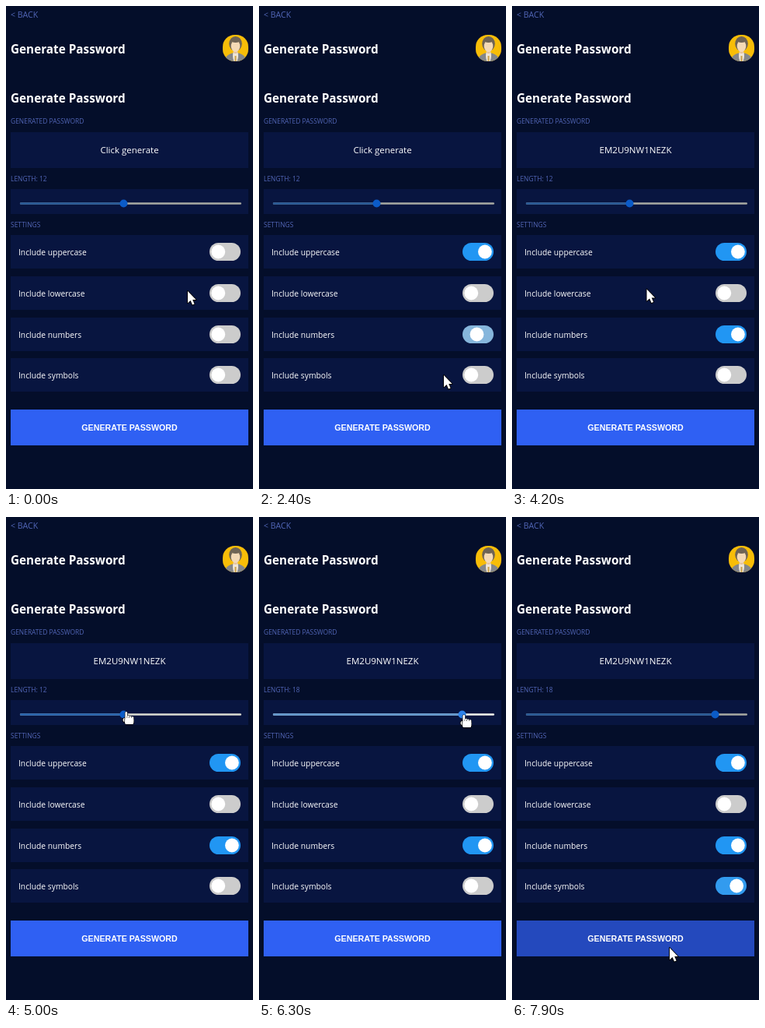
An HTML page with a canvas that plays this animation: 318 px wide and 620 px high, repeating every 8 s.

```html
<!DOCTYPE html>
<html lang="en">
<head>
<meta charset="utf-8">
<title>Generate Password</title>
<style>
  html, body { margin: 0; width: 100%; height: 100%; overflow: hidden; background: #040e2a; }
  canvas { display: block; width: 318px; height: 620px; }
</style>
</head>
<body>
<canvas id="stage"></canvas>
<script>
const W = 318, H = 620, LOOP = 8000, TICK = 100;
const canvas = document.getElementById('stage');
const ctx = canvas.getContext('2d');
const dpr = window.devicePixelRatio || 1;
canvas.width = W * dpr;
canvas.height = H * dpr;

const SANS = '"Open Sans", "Noto Sans", sans-serif';
const BUTTON_FONT = 'bold 10.67px "Liberation Sans", Arial, sans-serif';
const BG = '#040e2a', PANEL = '#081540', LABEL = '#5165b5';

const DRAG_START = 5200, DRAG_END = 6100, RELEASE = 6300, GENERATED = 3100;

// Each move glides on from wherever the pointer rests.
const home = { x: 234, y: 366 };
const moves = [
  { from: 100, to: 800, x: 284, y: 325 },
  { from: 1200, to: 1800, x: 280, y: 418 },
  { from: 2200, to: 2400, x: 238, y: 474 },
  { from: 2600, to: 2900, x: 201, y: 541 },
  { from: 3700, to: 4500, x: 157, y: 257 },
  { from: 4500, to: 5000, x: 155, y: 250 },
  { from: DRAG_START, to: DRAG_END, x: 264, y: 254 },
  { from: RELEASE, to: 6600, x: 305, y: 310 },
  { from: 6600, to: 7000, x: 296, y: 415 },
  { from: 7000, to: 7400, x: 283, y: 476 },
  { from: 7600, to: 7900, x: 203, y: 553 }
];

const switches = [
  { name: 'uppercase', on: 1250 },
  { name: 'lowercase', on: Infinity },
  { name: 'numbers', on: 2300 },
  { name: 'symbols', on: 7650 }
].map((s, i) => ({ ...s, y: Math.round(294 + i * 52.8) }));

const clamp = (v, a, b) => Math.min(b, Math.max(a, v));
const mix = (a, b, p) => a + (b - a) * p;

// CSS "ease": cubic-bezier(.25, .1, .25, 1)
function ease(x) {
  const bez = (u, a, b) => 3 * u * (1 - u) ** 2 * a + 3 * u * u * (1 - u) * b + u ** 3;
  let lo = 0, hi = 1;
  for (let i = 0; i < 20; i++) {
    const mid = (lo + hi) / 2;
    if (bez(mid, 0.25, 0.25) < x) lo = mid; else hi = mid;
  }
  return bez(lo, 0.1, 1);
}

function pointerAt(t) {
  return moves.reduce((at, m) => {
    const p = clamp((t - m.from) / (m.to - m.from), 0, 1);
    return { x: mix(at.x, m.x, p), y: mix(at.y, m.y, p) };
  }, home);
}

function box(x, y, w, h, color, r = 0) {
  ctx.fillStyle = color;
  ctx.beginPath();
  ctx.roundRect(x, y, w, h, r);
  ctx.fill();
}

function oval(x, y, rx, ry, color) {
  ctx.fillStyle = color;
  ctx.beginPath();
  ctx.ellipse(x, y, rx, ry, 0, 0, Math.PI * 2);
  ctx.fill();
}

function text(str, x, y, font, color = '#fff', align = 'left') {
  ctx.font = font;
  ctx.fillStyle = color;
  ctx.textAlign = align;
  ctx.fillText(str, x, y);
}

const label = (str, y) => text(str, 6, y, `8.45px ${SANS}`, LABEL);

function avatar() {
  const x = 295.5;
  ctx.save();
  ctx.beginPath();
  ctx.roundRect(279, 37, 33, 34, 15.5);
  ctx.clip();
  box(279, 37, 33, 34, '#f8bd08');
  oval(x, 70, 13.5, 10, '#85878a');
  oval(x, 64, 3.5, 8, '#f0e6d8');
  box(x - 1, 64, 2, 8, '#c9a14a');
  oval(x, 48.5, 8.3, 9.5, '#6f6455');
  box(x - 2.5, 55, 5, 6, '#e6c39c', 2);
  oval(x, 51.5, 5.8, 7.5, '#f4d9b6');
  oval(x, 43.5, 6.5, 3.5, '#6f6455');
  ctx.restore();
}

function slider(t, hover) {
  const drag = t > DRAG_START && t <= RELEASE;
  const knob = pointerAt(clamp(t, DRAG_START, DRAG_END)).x;
  const value = Math.round(5 + (knob - 23) / 18.35);
  const x = 23 + (value - 5) * 18.35;
  const [left, right, thumb] = drag ? ['#5b92cb', '#f8f8ee', '#2f83ea']
    : hover ? ['#1f5dab', '#dcddd2', '#0b5cc8']
    : ['#225596', '#a9aaa3', '#0b5bc8'];
  label(`LENGTH: ${value}`, 224.5);
  box(6, 235, 306, 32, PANEL);
  box(18, 252.2, 285, 2.6, right, 1.3);
  box(18, 252.2, x - 18, 2.6, left, 1.3);
  oval(x, 253.5, 5, 5, thumb);
}

function toggle(s, t) {
  const p = ease(clamp((t - s.on) / 400, 0, 1));
  const rgb = [33, 150, 243].map(c => Math.round(mix(204, c, p)));
  box(6, s.y, 306, 43, PANEL);
  text(`Include ${s.name}`, 16, s.y + 25.7, `500 10.3px ${SANS}`);
  box(262, s.y + 10, 40, 23, `rgb(${rgb})`, 11.5);
  oval(mix(273.3, 290.9, p), s.y + 21.5, 8.9, 8.9, '#fff');
}

const arrow = new Path2D('M0 0V15.2L3.6 12L6 17.6L8.6 16.5L6.2 11H10.6Z');

function outlined(path, line) {
  ctx.lineWidth = line;
  ctx.stroke(path);
  ctx.fill(path);
}

function rounded(x, y, w, h, r) {
  const path = new Path2D();
  path.roundRect(x, y, w, h, r);
  return path;
}

function hand() {
  const palm = rounded(-1.8, 8, 11, 8, 2);
  outlined(rounded(-4.4, 8, 4, 5, 2), 1.6);
  outlined(palm, 1.6);
  outlined(rounded(-1.6, 0, 2.8, 11, 1.4), 1.2);
  for (let i = 0; i < 3; i++) outlined(rounded(1.2 + i * 2.7, 4.8 + i * 0.7, 2.7, 7, 1.3), 1);
  ctx.fill(palm);
}

function pointer({ x, y }, over) {
  ctx.save();
  ctx.translate(x, y);
  ctx.lineJoin = 'round';
  ctx.strokeStyle = '#000';
  ctx.fillStyle = '#fff';
  if (over) hand(); else outlined(arrow, 1.8);
  ctx.restore();
}

function draw(t) {
  const at = pointerAt(t);
  const onSlider = at.y > 247 && at.y < 256;
  const onSwitch = at.x >= 262 && at.x <= 302 &&
    switches.some(s => at.y >= s.y + 10 && at.y <= s.y + 33);
  const onButton = at.y >= 518 && at.y <= 564;

  ctx.setTransform(dpr, 0, 0, dpr, 0, 0);
  box(0, 0, W, H, BG);
  text('< BACK', 6, 15, `10.6px ${SANS}`, LABEL);
  for (const y of [61, 123.5]) text('Generate Password', 6, y, `bold 15.3px ${SANS}`);
  avatar();

  label('GENERATED PASSWORD', 150.7);
  box(6, 162, 306, 46, PANEL);
  text(t < GENERATED ? 'Click generate' : 'EM2U9NW1NEZK', 159, 189, `500 11.5px ${SANS}`, '#fff', 'center');

  slider(t, onSlider);
  label('SETTINGS', 283.7);
  switches.forEach(s => toggle(s, t));

  box(6, 518, 306, 46, onButton ? '#2449bd' : '#2f60f3');
  text('GENERATE PASSWORD', 159, 545, BUTTON_FONT, '#fff', 'center');
  pointer(at, onSlider || onSwitch);
}

function frame(now) {
  const t = now % LOOP;
  draw(t - t % TICK);
  requestAnimationFrame(frame);
}
requestAnimationFrame(frame);
</script>
</body>
</html>
```
